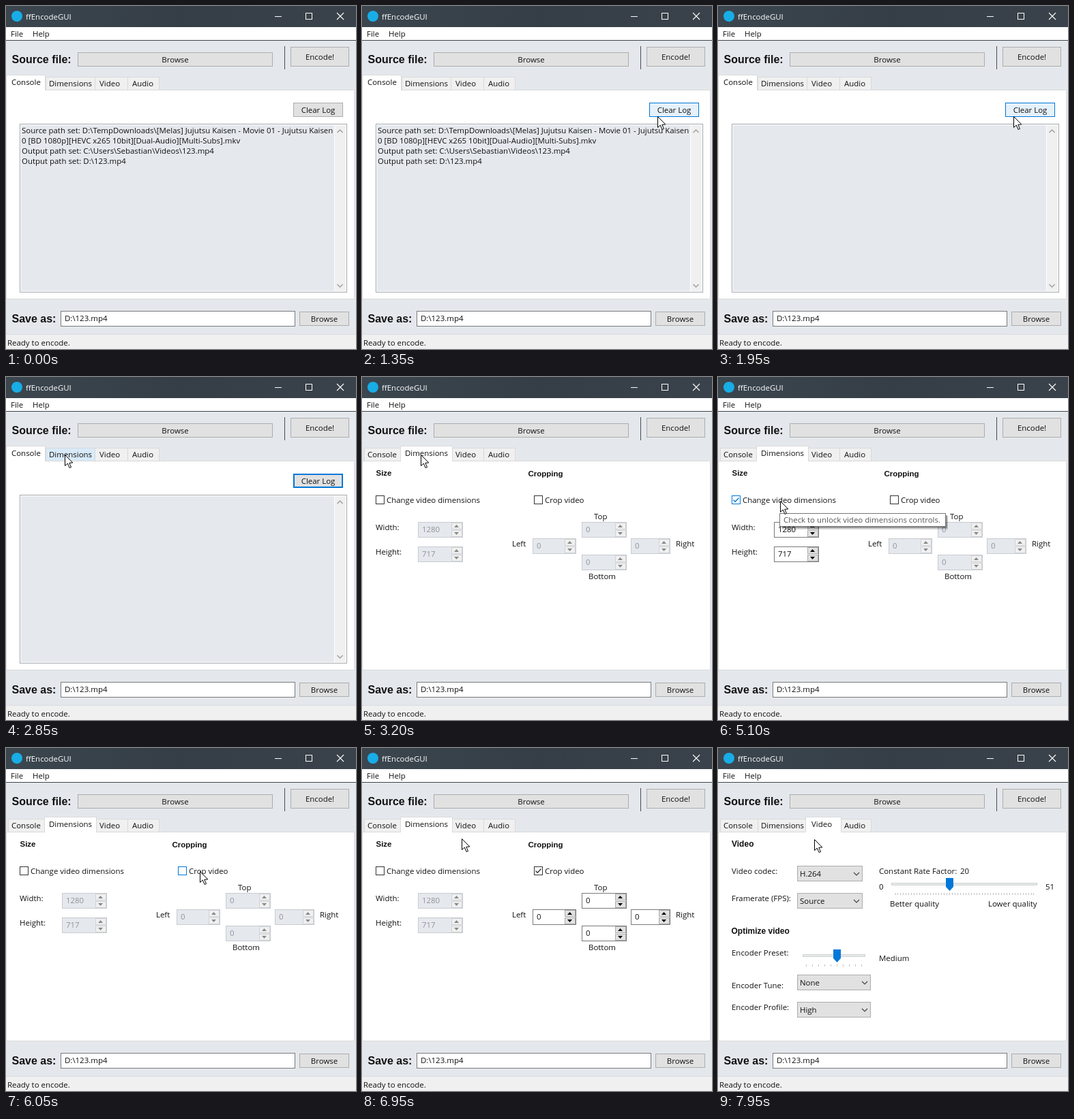
An HTML page with a canvas that plays this animation: 513 px wide and 504 px high, repeating every 8000 ms.

```html
<!DOCTYPE html>
<html lang="en">
<head>
<meta charset="utf-8">
<title>ffEncodeGUI</title>
<style>
html, body { margin: 0; width: 100%; height: 100%; overflow: hidden; background: #e4e8ed; }
canvas { display: block; width: 513px; height: 504px; }
</style>
</head>
<body>
<canvas id="stage" width="513" height="504"></canvas>
<script>
const ctx = document.getElementById('stage').getContext('2d');
const LOOP = 8000, STEP = 50;
const UI = '11.45px "Open Sans", "Noto Sans", sans-serif';
const bold = size => `bold ${size}px "Liberation Sans", Arial, sans-serif`;
const BLUE = '#0078d7', FACE = '#e1e1e1', EDGE = '#adadad', BODY = '#e4e8ed', PALE = '#f0f0f0';

// pointer path: time, x, y
const path = [
  [450, 456, 508], [1150, 440, 158], [1350, 433, 162], [2150, 433, 162],
  [2600, 108, 114], [2700, 108, 114], [2800, 82, 114], [2850, 86, 114],
  [3250, 86, 114], [3750, 82, 153], [4000, 88, 174], [4200, 91, 182],
  [5550, 91, 182], [6050, 284, 181], [6350, 284, 181], [6950, 146, 133],
  [7050, 148, 129], [7350, 150, 112], [7550, 150, 112], [7950, 141, 134]
];
const CLEAR = 1750, DIMS = 3200, SIZE_ON = 4250, TIP = 4650,
      SIZE_OFF = 5450, CROP_ON = 6200, VIDEO = 7500;
const mouse = { x: -50, y: -50 };

const within = (t, a, b) => t >= a && t < b;
const over = (x1, y1, x2, y2) => mouse.x >= x1 && mouse.x <= x2 && mouse.y >= y1 && mouse.y <= y2;

function moveMouse(t) {
  mouse.x = mouse.y = -50;
  if (t < path[0][0]) return;
  let i = 0;
  while (i < path.length - 2 && t >= path[i + 1][0]) i++;
  const [t1, x1, y1] = path[i], [t2, x2, y2] = path[i + 1];
  const k = Math.min(1, (t - t1) / (t2 - t1)), e = k * k * (3 - 2 * k);
  mouse.x = Math.round(x1 + (x2 - x1) * e);
  mouse.y = Math.round(y1 + (y2 - y1) * e);
}

function fill(x1, y1, x2, y2, color) {
  ctx.fillStyle = color;
  ctx.fillRect(x1, y1, x2 - x1, y2 - y1);
}

function box(x1, y1, x2, y2, face, edge, line = 1) {
  fill(x1, y1, x2, y2, edge);
  fill(x1 + line, y1 + line, x2 - line, y2 - line, face);
}

function text(str, x, y, color = '#111', font = UI, align = 'left') {
  ctx.font = font;
  ctx.fillStyle = color;
  ctx.textAlign = align;
  ctx.fillText(str, x, y);
}

function stroke(points, color, width = 1) {
  ctx.beginPath();
  points.forEach(([x, y]) => ctx.lineTo(x, y));
  ctx.strokeStyle = color;
  ctx.lineWidth = width;
  ctx.stroke();
}

function shape(points, color) {
  ctx.beginPath();
  points.forEach(([x, y]) => ctx.lineTo(x, y));
  ctx.closePath();
  ctx.fillStyle = color;
  ctx.fill();
}

// d is 1 for down, -1 for up
const chevron = (x, y, d, color, width = 1) =>
  stroke([[x - 4, y - 2 * d], [x, y + 2 * d], [x + 4, y - 2 * d]], color, width);

function button(label, x1, y1, x2, y2, face = FACE, edge = EDGE, line = 1) {
  box(x1, y1, x2, y2, face, edge, line);
  text(label, (x1 + x2) / 2, Math.round((y1 + y2) / 2) + 4, '#111', UI, 'center');
}

function windowFrame() {
  fill(0, 0, 513, 504, BODY);
  const bar = ctx.createLinearGradient(0, 0, 513, 0);
  bar.addColorStop(0, '#3b464f');
  bar.addColorStop(0.5, '#353e46');
  bar.addColorStop(1, '#3a434b');
  fill(0, 0, 513, 31, bar);
  ctx.beginPath();
  ctx.arc(16, 15, 8, 0, 7);
  ctx.fillStyle = '#18ade6';
  ctx.fill();
  text('ffEncodeGUI', 29, 20, '#fff');
  fill(394, 15, 404, 16, '#fff');
  ctx.strokeStyle = '#fff';
  ctx.lineWidth = 1;
  ctx.strokeRect(439.5, 10.5, 9, 9);
  stroke([[485, 10], [495, 20]], '#fff', 1.1);
  stroke([[495, 10], [485, 20]], '#fff', 1.1);

  fill(0, 31, 513, 50, '#fff');
  fill(0, 50, 513, 51, '#3c444b');
  text('File', 7, 45);
  text('Help', 39, 45);

  text('Source file:', 8.5, 84, '#111', bold(16));
  button('Browse', 105, 68, 391, 89);
  fill(408, 59, 409, 93, '#4a4a4a');
  button('Encode!', 417, 60, 503, 89);

  text('Save as:', 8.5, 465, '#111', bold(16));
  box(80, 448, 424, 471, '#fff', '#7a7a7a');
  text('D:\\123.mp4', 86, 463);
  button('Browse', 430, 449, 503, 470);

  fill(0, 482, 513, 504, PALE);
  fill(0, 482, 513, 483, '#d9dce0');
  text('Ready to encode.', 2, 499);
}

function tabs(active) {
  box(0, 123, 511, 431, '#fff', '#dadada');
  const list = [['Console', 3, 59, 8], ['Dimensions', 58, 131, 63], ['Video', 130, 179, 137], ['Audio', 178, 225, 185]];
  list.forEach(([name, x1, x2, tx], i) => {
    if (i === active) return;
    const hot = over(x1, 104, x2 - 1, 122);
    box(x1, 104, x2, 124, hot ? '#d8eaf9' : PALE, '#d9d9d9');
    text(name, tx, 118);
  });
  const [name, x1, x2, tx] = list[active];
  const left = active ? x1 - 2 : 0, right = active ? x2 + 2 : 58;
  box(left, 101, right, 124, '#fff', '#dadada');
  fill(left + 1, 122, right - 1, 125, '#fff');
  text(name, tx, 116);
}

function consolePage(t) {
  const hot = over(421, 142, 494, 163), down = within(t, CLEAR - 100, CLEAR), focus = t >= CLEAR;
  button('Clear Log', 421, 142, 494, 163,
    down ? '#cce4f7' : hot ? '#e5f1fb' : FACE,
    down ? '#005499' : hot || focus ? BLUE : EDGE, focus && !hot ? 2 : 1);
  box(20, 173, 500, 421, '#fff', '#a5a9ae');
  fill(22, 175, 481, 419, '#e5e9ee');
  fill(482, 175, 498, 419, PALE);
  chevron(489.5, 184, -1, '#a0a0a0', 1.5);
  chevron(489.5, 411, 1, '#a0a0a0', 1.5);
  if (t >= CLEAR) return;
  [
    'Source path set: D:\\TempDownloads\\[Melas] Jujutsu Kaisen - Movie 01 - Jujutsu Kaisen',
    '0 [BD 1080p][HEVC x265 10bit][Dual-Audio][Multi-Subs].mkv',
    'Output path set: C:\\Users\\Sebastian\\Videos\\123.mp4',
    'Output path set: D:\\123.mp4'
  ].forEach((line, i) => text(line, 23, 187 + i * 15));
}

function checkbox(label, x, on, right) {
  const color = over(x, 173, right, 189) ? BLUE : '#333';
  box(x, 174, x + 13, 187, '#fff', color);
  if (on) stroke([[x + 2.5, 180.5], [x + 5.2, 183.3], [x + 10.5, 177.5]], color, 1.3);
  text(label, x + 16, 185);
}

function spin(value, x1, y, x2, on) {
  box(x1, y, x2, y + 23, on ? '#fff' : '#e5e9ee', on ? '#7a7a7a' : '#c8cbd0');
  text(value, x1 + 6, y + 15, on ? '#111' : '#909398');
  const mid = x2 - 9.5, ink = on ? '#000' : '#888';
  for (const [top, d] of [[y + 1, -1], [y + 12, 1]]) {
    box(x2 - 17, top, x2 - 1, top + 10, on ? FACE : PALE, on ? EDGE : '#d0d2d5');
    const c = top + 5;
    shape([[mid - 3.5, c - 2 * d], [mid + 3.5, c - 2 * d], [mid, c + 2 * d]], ink);
  }
}

function dimensionsPage(t) {
  const size = within(t, SIZE_ON, SIZE_OFF), crop = t >= CROP_ON;
  text('Size', 20.5, 145, '#111', bold(11.5));
  text('Cropping', 243.5, 146, '#111', bold(11.5));
  checkbox('Change video dimensions', 20, size, 174);
  checkbox('Crop video', 252, crop, 327);
  text('Width:', 20, 225);
  spin('1280', 82, 213, 148, size);
  text('Height:', 20, 261);
  spin('717', 82, 249, 148, size);
  text('Top', 340, 209);
  spin('0', 322, 213, 388, crop);
  text('Left', 220, 249);
  spin('0', 250, 237, 314, crop);
  spin('0', 394, 237, 452, crop);
  text('Right', 460, 249);
  spin('0', 322, 261, 388, crop);
  text('Bottom', 332, 297);
  if (within(t, TIP, SIZE_OFF)) tooltip(Math.min(1, (t - TIP + STEP) / 250));
}

function tooltip(alpha) {
  ctx.globalAlpha = alpha;
  fill(94, 204, 337, 224, 'rgba(0,0,0,.16)');
  fill(93, 203, 336, 222, 'rgba(0,0,0,.3)');
  box(90, 200, 334, 220, '#fff', '#767676');
  text('Check to unlock video dimensions controls.', 96, 214, '#575757');
  ctx.globalAlpha = 1;
}

function combo(value, y, x2) {
  box(116, y, x2, y + 23, FACE, EDGE);
  text(value, 120, y + 16);
  chevron(x2 - 9, y + 12, 1, '#444', 1.2);
}

function slider(x1, x2, y, thumb, first, step, count) {
  box(x1, y, x2, y + 4, '#e7eaea', '#d0d2d2');
  for (let i = 0; i < count; i++) {
    const x = Math.round(first + i * step);
    fill(x, y + 15, x + 1, y + 18, '#c0c0c0');
  }
  const m = Math.round(first + thumb * step) + 0.5, top = y - 7;
  shape([[m - 5.5, top], [m + 5.5, top], [m + 5.5, top + 13], [m, top + 19], [m - 5.5, top + 13]], BLUE);
}

function videoPage() {
  text('Video', 20, 145, '#111', bold(12));
  text('Video codec:', 20, 185);
  combo('H.264', 173, 212);
  text('Framerate (FPS):', 20, 225);
  combo('Source', 213, 212);
  text('Constant Rate Factor:', 236, 185);
  text('20', 355, 185);
  text('0', 236, 208);
  slider(254, 468, 198, 20, 259.5, 3.98, 52);
  text('51', 480, 208);
  text('Better quality', 252, 233);
  text('Lower quality', 396, 233);
  text('Optimize video', 19.5, 273, '#111', bold(12));
  text('Encoder Preset:', 20, 305);
  slider(124, 216, 303, 5, 129, 9, 10);
  text('Medium', 236, 313);
  text('Encoder Tune:', 20, 353);
  combo('None', 333, 224);
  text('Encoder Profile:', 20, 385);
  combo('High', 373, 224);
}

function pointer() {
  const p = [[0, 0], [0, 16], [3.8, 12.6], [6.6, 19], [9, 18], [6.3, 11.8], [11.3, 11.5]]
    .map(([x, y]) => [mouse.x + x + 0.5, mouse.y + y + 0.5]);
  shape(p, '#fff');
  stroke([...p, p[0]], '#000');
}

function draw(now) {
  const t = Math.floor((now % LOOP) / STEP) * STEP;
  moveMouse(t);
  windowFrame();
  const page = t < DIMS ? 0 : t < VIDEO ? 1 : 2;
  tabs(page);
  [consolePage, dimensionsPage, videoPage][page](t);
  pointer();
}

const start = performance.now();
function frame() {
  draw(performance.now() - start);
  requestAnimationFrame(frame);
}
frame();
</script>
</body>
</html>
```
